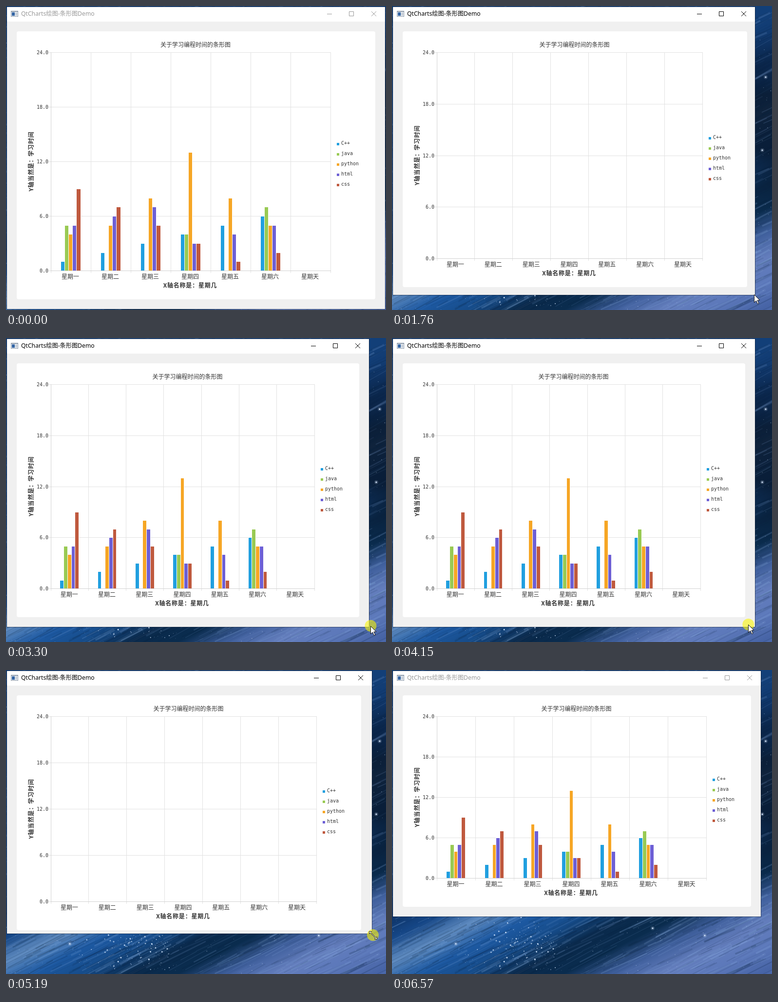
An HTML page with a canvas that plays this animation: 780x624 px, repeating every 6640 ms.

```html
<!DOCTYPE html>
<html lang="zh">
<head>
<meta charset="utf-8">
<title>QtCharts</title>
<style>
html, body { margin: 0; width: 780px; height: 624px; overflow: hidden; background: #0b2347; }
canvas { display: block; }
</style>
</head>
<body>
<canvas id="stage" width="780" height="624"></canvas>
<script>
const LOOP = 6640;
const LAG = 70; // the chart is laid out a little after the window
const CJK = '"Noto Sans CJK SC", "Noto Sans CJK JP", "Noto Sans CJK", sans-serif';
const MONO = '10px "DejaVu Sans Mono", monospace';
const LABEL = '12px ' + CJK;
const BOLD = 'bold 12px ' + CJK;
const TITLE = '12.2px "Noto Sans", ' + CJK;

const series = { 'C++': '#209fdf', java: '#99ca53', python: '#f6a625', html: '#6d5fd5', css: '#bf593e' };
const colors = Object.values(series);
const days = [...'一二三四五六天'];
const hours = [[1, 5, 4, 5, 9], [2, 0, 5, 6, 7], [3, 0, 8, 7, 5], [4, 4, 13, 3, 3], [5, 0, 8, 4, 1], [6, 7, 5, 5, 2]];

// Key points: time, x, y
const cornerPath = [[1230, 778, 622], [1300, 776, 622], [1390, 776, 622], [1740, 745, 593],
  [4860, 745, 593], [4920, 742, 593], [5372, 757, 506]];
const mousePath = [[100, 707, 640], [270, 768, 623], [1230, 776, 620], [1370, 761, 616], [1740, 743, 592]];

const g = document.getElementById('stage').getContext('2d');
const clamp = k => Math.min(1, Math.max(0, k));

function along(path, t) {
  let [, x, y] = path[0];
  path.slice(1).forEach(([t1, x1, y1], i) => {
    const t0 = path[i][0], k = clamp((t - t0) / (t1 - t0));
    x += (x1 - path[i][1]) * k;
    y += (y1 - path[i][2]) * k;
  });
  return [Math.round(x), Math.round(y)];
}

function rect(x, y, w, h, color) {
  g.fillStyle = color;
  g.fillRect(x, y, w, h);
}

function text(str, x, y, font, color = '#333', align = 'left', spacing = 0) {
  g.font = font;
  g.fillStyle = color;
  g.textAlign = align;
  g.letterSpacing = spacing + 'px';
  g.fillText(str, x, y);
}

function shape(points, fill, stroke) {
  g.beginPath();
  points.forEach(([x, y]) => g.lineTo(x, y));
  g.closePath();
  g.fillStyle = fill;
  g.strokeStyle = stroke;
  g.lineWidth = 1;
  g.fill();
  g.stroke();
}

// Diagonal colour bands, brushed with seeded streaks and sprinkled with stars
function makeSky() {
  const sky = document.createElement('canvas');
  sky.width = 780;
  sky.height = 624;
  const s = sky.getContext('2d');
  let seed = 7;
  const rnd = () => (seed = seed * 16807 % 2147483647) / 2147483647;
  const bell = () => (rnd() + rnd() + rnd()) / 1.5 - 1;
  const fill = (paint) => { s.fillStyle = paint; s.fillRect(0, 0, 780, 624); };

  const bands = s.createLinearGradient(0, 400, 240, 880);
  ['#123f78', '#113a70', '#0d3264', '#154686', '#5f8bc0', '#1d59a2', '#164c8a', '#0a2a4c', '#0a2c4e',
    '#3f5f9c', '#637dbc', '#5c78ba', '#4764a6'].forEach((c, i, all) => bands.addColorStop(i / (all.length - 1), c));
  fill(bands);
  const shade = s.createRadialGradient(780, 240, 60, 780, 240, 190);
  shade.addColorStop(0, 'rgba(7,24,46,.9)');
  shade.addColorStop(1, 'rgba(7,24,46,0)');
  fill(shade);

  for (let i = 0; i < 2200; i++) {
    const x = rnd() * 780, y = rnd() * 624, l = 8 + rnd() * 40;
    s.strokeStyle = rnd() < .4 ? '#8fb4e4' : '#06203c';
    s.globalAlpha = .04 + rnd() * .18;
    s.lineWidth = .5 + rnd() * 3.5;
    s.beginPath();
    s.moveTo(x - l, y + l * (.4 + rnd() * .2));
    s.lineTo(x + l, y - l * (.4 + rnd() * .2));
    s.stroke();
  }
  const star = (x, y, r, alpha) => {
    s.globalAlpha = alpha;
    s.fillStyle = '#d6e8ff';
    s.beginPath();
    s.arc(x, y, r, 0, 7);
    s.fill();
  };
  for (let i = 0; i < 900; i++) star(rnd() * 780, rnd() * 624, .3 + rnd() * .5, .2 + rnd() * .4);
  for (let i = 0; i < 200; i++) star(270 + bell() * 140, 570 + bell() * 75, .4 + rnd() ** 3 * 1.2, .4 + rnd() * .6);
  [[535, 530], [131, 562], [642, 545], [767, 146], [760, 296]].forEach(([x, y]) => {
    star(x, y, 4, .2);
    star(x, y, 1.6, 1);
  });
  return sky;
}

function drawFrame(right, bottom, active) {
  rect(1, 1, right, bottom, 'rgba(10,25,50,.55)');
  rect(2, 2, right - 2, bottom - 2, '#f0f0f0');
  rect(2, 2, right - 2, 30, '#fff');
  rect(10, 10, 15, 12, '#8b98a8');
  rect(11, 12, 13, 9, '#f4f6f8');
  rect(12, 13, 6, 7, '#3465a4');
  rect(19, 13, 4, 7, '#c6ced8');
  const ink = active ? '#000' : '#999';
  text('QtCharts绘图-条形图Demo', 31, 17, TITLE, ink);
  g.strokeStyle = ink;
  g.lineWidth = 1;
  g.beginPath();
  g.moveTo(right - 119, 16.5);
  g.lineTo(right - 109, 16.5);
  g.rect(right - 73.5, 11.5, 9, 9);
  g.moveTo(right - 28, 11);
  g.lineTo(right - 18, 21);
  g.moveTo(right - 18, 11);
  g.lineTo(right - 28, 21);
  g.stroke();
}

function drawBars(step, floor, unit) {
  const w = step / 10;
  hours.forEach((row, d) => row.forEach((v, i) => {
    const x = 92 + step * (d + .25) + w * i;
    const left = Math.round(x), wide = Math.round(x + w) - left, h = Math.round(v * unit);
    if (h < 2) return;
    rect(left - 1, floor - h, wide + 1, h, '#fff');
    rect(left, floor - h + 1, wide - 1, h - 1, colors[i]);
  }));
}

function drawChart(right, bottom, grow) {
  const edge = right - 112, floor = bottom - 79, step = (edge - 92) / 7, tall = floor - 95;
  g.fillStyle = '#fff';
  g.beginPath();
  g.roundRect(22, 52, right - 42, bottom - 72, 4);
  g.fill();
  text('关于学习编程时间的条形图', right / 2, 79, LABEL, '#333', 'center');

  for (let i = 0; i < 5; i++) {
    const y = Math.round(floor - tall * i / 4);
    rect(88, y, edge - 87, 1, '#e2e2e2');
    text((i * 6).toFixed(1), 87, y + 1, MONO, '#333', 'right');
  }
  for (let i = 0; i < 8; i++) {
    rect(Math.floor(92 + step * i), 95, 1, tall + 5, '#e2e2e2');
    if (i < 7) text('星期' + days[i], 91 + step * (i + .5), floor + 12, LABEL, '#333', 'center');
  }
  drawBars(step, floor, tall / 24 * grow);
  rect(92, 95, 1, tall, '#d2d2d2');
  rect(92, floor, edge - 91, 1, '#d2d2d2');

  text('X轴名称是：星期几', (92 + edge) / 2 - 1, floor + 30, BOLD, '#333', 'center', .8);
  g.save();
  g.translate(50, (95 + floor) / 2);
  g.rotate(-Math.PI / 2);
  text('Y轴当然是：学习时间', 0, 1, BOLD, '#333', 'center', .8);
  g.restore();

  Object.keys(series).forEach((name, i) => {
    const y = Math.round(bottom / 2 + 14 + (i - 2) * 21);
    rect(right - 99, y - 2, 5, 5, colors[i]);
    text(name, right - 90, y - 1, MONO);
  });
}

function mouseAt(t, corner) {
  if (t < 1740) return along(mousePath, t);
  if (t > 4540) return [corner[0] + 2 + Math.max(0, t - 6200) * .15, corner[1] + 3];
  const k = clamp((t - 3200) / 1340);
  return [743 + 12 * Math.sin(k * 2 * Math.PI), 592 - 5 * Math.sin(k * Math.PI)];
}

function drawMouse(t, corner) {
  if (t < 100 || t > 6480) return;
  const [x, y] = mouseAt(t, corner);
  const plain = t > 1700 && t < 3030 || t > 5450 && t < 6200;
  if (!plain) {
    g.fillStyle = 'rgba(250,245,0,.58)';
    g.beginPath();
    g.arc(x, y, 12, 0, 7);
    g.fill();
  }
  g.save();
  g.translate(Math.round(x) + .5, Math.round(y) + .5);
  if (t > 970 && t < 1740 || t > 4290 && t < 6200) {
    const half = [[-5, -6], [-3, -8], [-8, -8], [-8, -3], [-6, -5]];
    shape([...half, ...half.map(([a, b]) => [-a, -b])], '#fff', '#222');
  } else {
    shape([[0, 0], [0, 16], [4, 12.5], [7, 19], [9.5, 18], [6.5, 11.5], [11.5, 11.5]], '#fff', '#111');
  }
  g.restore();
}

// Bars restart from zero after each resize and grow with a quartic ease-out.
function growth(t) {
  const start = t < 1400 ? -1000 : t < 4950 ? 1850 : 5372;
  return 1 - (1 - clamp((t - start) / 1000)) ** 4;
}

const sky = makeSky();
const origin = performance.now();

function draw() {
  const t = (performance.now() - origin) % LOOP;
  const corner = along(cornerPath, t);
  g.textBaseline = 'middle';
  g.drawImage(sky, 0, 0);
  drawFrame(...corner, t > 900 && t < 6400);
  drawChart(...along(cornerPath, t - LAG), growth(t));
  drawMouse(t, corner);
  requestAnimationFrame(draw);
}
draw();
</script>
</body>
</html>
```
